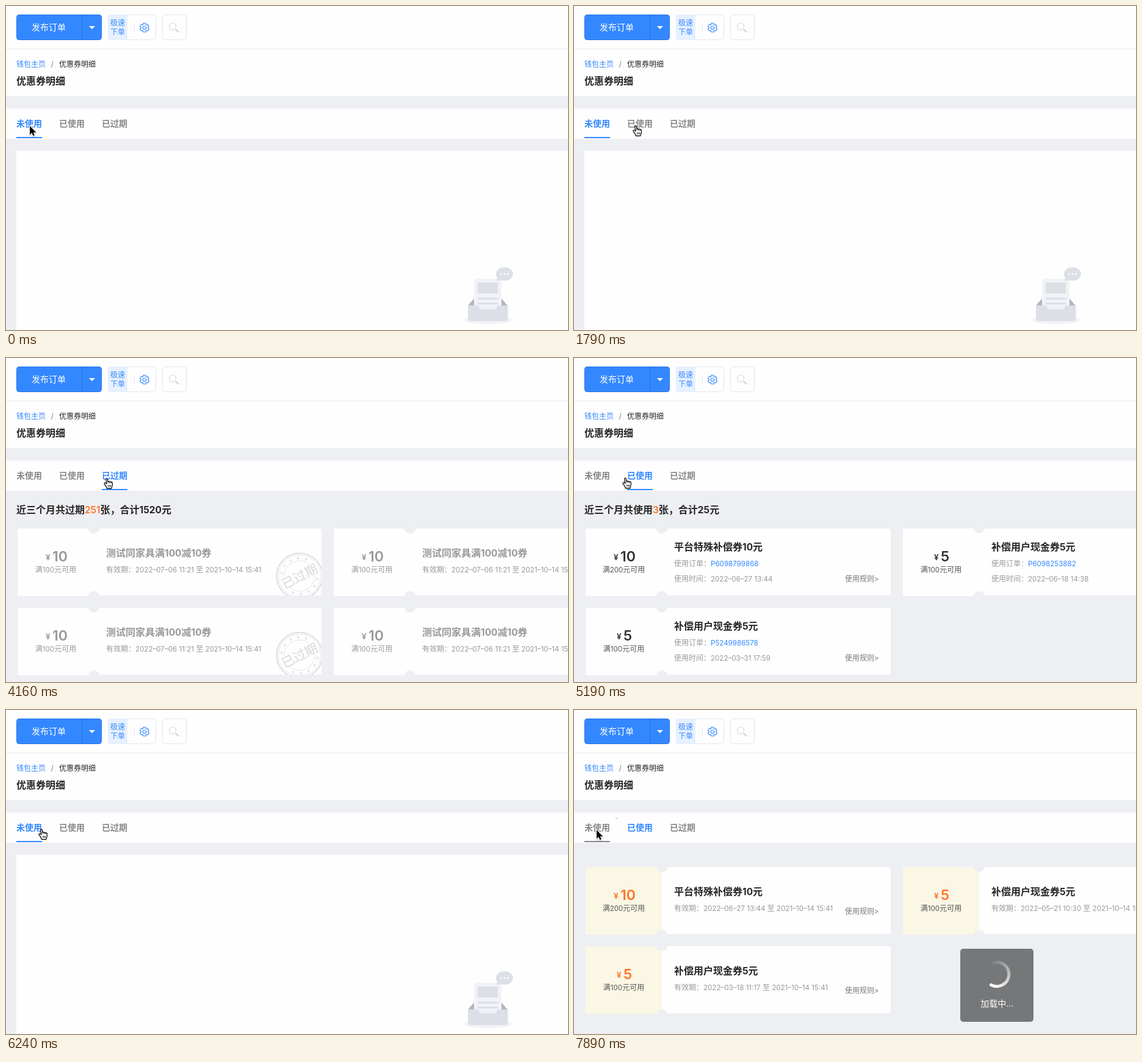
These frames come from a looping animation (921x532 px, 8000 ms). An HTML page with a canvas:

```html
<!DOCTYPE html>
<html lang="zh-CN">
<head>
<meta charset="utf-8">
<title>优惠券明细</title>
<style>
html, body { margin: 0; width: 100%; height: 100%; overflow: hidden; background: #fefefe; }
canvas { display: block; }
</style>
</head>
<body>
<canvas id="stage" width="921" height="532"></canvas>
<script>
const ctx = document.getElementById('stage').getContext('2d');
const W = 921, H = 532, LOOP = 8000, TICK = 148.7;
const BLUE = '#3388ff', GRAY = '#888888', ORANGE = '#ff7426', INK = '#262626';
const PAGE = '#eeeff3', PAPER = '#fefefe', PALE = '#dcdfe6';

const couponsUsed = [
  { price: 10, min: 200, title: '平台特殊补偿券10元', id: 'P6098799868', at: '2022–06–27 13:44', from: '2022–06–27 13:44' },
  { price: 5, min: 100, title: '补偿用户现金券5元', id: 'P6098253882', at: '2022–06–18 14:38', from: '2022–05–21 10:30' },
  { price: 5, min: 100, title: '补偿用户现金券5元', id: 'P5249986578', at: '2022–03–31 17:59', from: '2022–03–18 11:17' }
];
const expired = { price: 10, min: 100, title: '测试同家具满100减10券', id: '', at: '', from: '2022–07–06 11:21' };
const lists = {
  none: { items: [] },
  used: { items: couponsUsed, count: 3, sum: 25, pitch: 520 },
  old: { items: Array(4).fill(expired), count: 251, sum: 1520, pitch: 518 }
};

// Each scene holds until the next; prev and mix describe the tab colour change.
const scenes = [
  { at: 0, tab: 0, list: 'none' },
  { at: 14, tab: 1, list: 'none', busy: true, prev: 0, mix: 0 },
  { at: 16, tab: 1, list: 'used' },
  { at: 26, tab: 2, list: 'used', busy: true, prev: 1, mix: 0 },
  { at: 27, tab: 2, list: 'old' },
  { at: 33, tab: 1, list: 'old', busy: true, prev: 2, mix: 0 },
  { at: 34, tab: 1, list: 'used' },
  { at: 39, tab: 0, list: 'used', busy: true, prev: 1, mix: 0, badge: 0.2 },
  { at: 40, tab: 0, list: 'used', busy: true, badge: 1 },
  { at: 41, tab: 0, list: 'none' },
  { at: 47, tab: 1, list: 'none', busy: true, prev: 0, mix: 0.4 },
  { at: 48, tab: 1, list: 'none', busy: true },
  { at: 49, tab: 1, list: 'used' },
  { at: 53, tab: 0, list: 'used', busy: true, prev: 1, mix: 0, badge: 0.2 }
];

// Pointer moves: start tick, end tick, x, y.
const moves = [
  [2, 4, 77, 197], [5, 7, 41, 197], [8, 13, 108, 197], [20, 24, 165, 198],
  [29, 31, 97, 198], [34, 37, 47, 196], [41, 45, 117, 197], [48, 51, 37, 197]
];
const arrowSpans = [[0, 3], [14, 18], [26, 28], [33, 34], [39, 42], [47, 49], [53, 60]];

const isLatin = s => /[\x20-\x7e¥–]/.test(s);

function setFont(latin, size, weight) {
  ctx.font = latin
    ? `${weight} ${size * 0.965}px Inter, "Noto Sans CJK SC", sans-serif`
    : `${weight} ${size}px "Noto Sans CJK SC", "Noto Sans CJK", sans-serif`;
}

// Draws mixed text from x, centred on y; returns the end x.
function text(str, x, y, size, color, weight = 400, align = 0) {
  const runs = str.match(/[\x20-\x7e¥–]+|[^\x20-\x7e¥–]+/g) || [];
  const widths = runs.map(r => {
    setFont(isLatin(r), size, weight);
    return ctx.measureText(r).width;
  });
  x -= align * widths.reduce((a, b) => a + b, 0);
  ctx.fillStyle = color;
  runs.forEach((r, i) => {
    setFont(isLatin(r), size, weight);
    ctx.fillText(r, x, y + Math.round(size * 0.37));
    x += widths[i];
  });
  return x;
}

function rect(x, y, w, h, color) {
  ctx.fillStyle = color;
  ctx.fillRect(x, y, w, h);
}

function box(x, y, w, h, r, fill, stroke) {
  ctx.beginPath();
  ctx.roundRect(x, y, w, h, r);
  if (fill) { ctx.fillStyle = fill; ctx.fill(); }
  if (stroke) { ctx.strokeStyle = stroke; ctx.lineWidth = 1; ctx.stroke(); }
}

function oval(x, y, rx, ry, color) {
  ctx.beginPath();
  ctx.ellipse(x, y, rx, ry, 0, 0, Math.PI * 2);
  ctx.fillStyle = color;
  ctx.fill();
}

function ring(x, y, r, color, width) {
  ctx.beginPath();
  ctx.arc(x, y, r, 0, Math.PI * 2);
  ctx.strokeStyle = color;
  ctx.lineWidth = width;
  ctx.stroke();
}

function poly(points, color) {
  ctx.beginPath();
  points.forEach(p => ctx.lineTo(p[0], p[1]));
  ctx.closePath();
  if (color) { ctx.fillStyle = color; ctx.fill(); }
}

function blend(a, b, k) {
  const part = (c, i) => parseInt(c.substr(1 + i * 2, 2), 16);
  return `rgb(${[0, 1, 2].map(i => Math.round(part(a, i) + (part(b, i) - part(a, i)) * k))})`;
}

function gear(x, y) {
  const pts = [];
  for (let i = 0; i < 6; i++) {
    const a = i * Math.PI / 3 + Math.PI / 6;
    [[-0.4, 5.8], [-0.27, 7.6], [0.27, 7.6], [0.4, 5.8]].forEach(([d, r]) =>
      pts.push([x + Math.cos(a + d) * r, y + Math.sin(a + d) * r]));
  }
  poly(pts);
  ctx.strokeStyle = BLUE;
  ctx.lineWidth = 1.1;
  ctx.lineJoin = 'round';
  ctx.stroke();
  ring(x, y, 2.8, BLUE, 1.1);
}

function header() {
  rect(0, 0, W, H, PAPER);
  rect(0, 70, W, 1, '#ebecf0');
  box(17.5, 14.5, 139, 41, 4, BLUE, '#2b74dc');
  rect(124, 15, 1, 40, '#2b74dc');
  text('发布订单', 42, 35, 14, '#fff', 500);
  poly([[136, 33], [146, 33], [141, 38]], '#fff');

  box(167.5, 14.5, 78, 41, 4, PAPER, '#e1e4eb');
  box(167, 14, 32, 42, [4, 0, 0, 4], '#e6f0fe');
  text('极速', 171, 28, 12, BLUE);
  text('下单', 171, 43, 12, BLUE);
  rect(210, 30, 1, 11, '#e4e6ea');
  gear(227, 35.5);

  box(256.5, 14.5, 39, 41, 4, PAPER, '#e1e4eb');
  ring(273, 33.5, 5.5, '#d2d2d2', 1);
  ctx.beginPath();
  ctx.moveTo(277.5, 38);
  ctx.lineTo(283, 43);
  ctx.strokeStyle = '#bbb';
  ctx.lineWidth = 1.4;
  ctx.stroke();

  text('钱包主页', 17, 96, 12, BLUE);
  text('/', 73.5, 96, 12, '#777');
  text('优惠券明细', 87, 96, 12, INK);
  text('优惠券明细', 17, 123, 16, INK, 700);
  rect(0, 148, W, 20, PAGE);
  rect(0, 218, W, H - 218, PAGE);
}

function tabs({ tab, prev = -1, mix = 1, badge }) {
  ['未使用', '已使用', '已过期'].forEach((name, i) => {
    const k = i === tab ? mix : i === prev ? 1 - mix : 0;
    const color = blend(GRAY, BLUE, k);
    text(name, 17 + i * 70, 193, 14, color, 700);
    if (i === tab) rect(17 + i * 70, 215, 42, 2, color);
  });
  if (badge) {
    ctx.globalAlpha = badge;
    oval(70, 178, 10 * badge, 10 * badge, '#ff4d5f');
    if (badge === 1) text('3', 70, 178, 12, '#fff', 400, 0.5);
    ctx.globalAlpha = 1;
  }
}

function emptyView() {
  rect(17, 238, W, H, PAPER);
  oval(790, 516, 41, 6.5, '#f3f4f7');
  poly([[757, 492], [769, 478], [810, 478], [822, 492]], '#aeb5c1');
  box(767, 448, 45, 54, 1, '#f1f2f6');
  rect(773, 454, 33, 18, PALE);
  rect(773, 479, 33, 3, PALE);
  rect(773, 487, 33, 3, PALE);
  box(757, 491.5, 65.5, 26, [0, 0, 4, 4], PALE);
  poly([[773, 491], [806, 491], [803.5, 496], [801, 498], [778, 498], [775.5, 496]], '#f1f2f6');
  rect(773, 487, 33, 3, PALE);
  oval(817, 440, 14, 11, PALE);
  poly([[805, 443], [804.5, 451.5], [814, 449]], PALE);
  [811, 816.5, 822].forEach(x => oval(x, 440, 1.5, 1.5, '#fff'));
}

function stamp(x, y) {
  const color = '#dedede';
  ring(x, y, 37.5, color, 2);
  ring(x, y, 34.5, color, 0.8);
  ring(x, y, 25, color, 0.8);
  for (let i = 0; i < 14; i++) {
    const a = -0.3 + i * Math.PI * 2 / 14;
    if (Math.abs(Math.sin(a + 0.47)) < 0.35) continue;
    const cx = x + Math.cos(a) * 29.5, cy = y + Math.sin(a) * 29.5;
    const pts = [];
    for (let j = 0; j < 10; j++) {
      const b = j * Math.PI / 5 - Math.PI / 2, r = j % 2 ? 1.2 : 2.8;
      pts.push([cx + Math.cos(b) * r, cy + Math.sin(b) * r]);
    }
    poly(pts, color);
  }
  ctx.save();
  ctx.translate(x, y);
  ctx.rotate(-0.47);
  rect(-32, -10.5, 64, 21, PAPER);
  text('已过期', 0, 0, 21, '#d8d8d8', 400, 0.5);
  ctx.restore();
}

function card(c, x, y, w, tab) {
  const fresh = tab === 0, dead = tab === 2;
  const mute = '#999';
  box(x + 120, y, w - 120, 110, [0, 4, 4, 0], PAPER);
  box(x, y, 125, 111, [2, 0, 0, 2], fresh ? '#fbf7e5' : PAPER);
  ctx.save();
  ctx.beginPath();
  ctx.rect(x, y, w, 110);
  ctx.clip();
  if (dead) stamp(x + 462, y + 78);
  ctx.restore();
  oval(x + 125, y - 1.5, 9.7, 9.7, PAGE);
  oval(x + 125, y + 112.5, 9.7, 9.7, PAGE);

  const tone = fresh ? ORANGE : dead ? mute : '#333';
  const left = x + (c.price > 9 ? 46 : 51);
  text('¥', left, y + 47, 14, tone, 600);
  text(String(c.price), left + 11, y + 45, 24, tone, 600);
  text(`满${c.min}元可用`, x + 62.5, y + 68, 12, dead ? mute : '#555', 400, 0.5);

  const tx = x + 145;
  text(c.title, tx, y + (tab === 1 ? 30 : 40), 16, dead ? mute : INK, 700);
  if (tab === 1) {
    text(c.id, text('使用订单：', tx, y + 58, 12, mute), y + 58, 12, BLUE);
    text('使用时间：' + c.at, tx, y + 83, 12, mute);
  } else {
    text(`有效期：${c.from} 至 2021–10–14 15:41`, tx, y + 68, 12, mute);
  }
  if (!dead) text('使用规则>', x + 425, y + (fresh ? 73 : 83), 12, '#777');
}

function listView({ tab, list }) {
  const { items, count, sum, pitch } = lists[list];
  if (!items.length) return emptyView();
  const top = tab ? 280 : 258;
  if (tab) {
    let x = text(tab === 1 ? '近三个月共使用' : '近三个月共过期', 17, 249, 16, INK, 700);
    x = text(String(count), x, 249, 16, ORANGE, 600);
    text(`张，合计${sum}元`, x, 249, 16, INK, 700);
  }
  items.forEach((c, i) =>
    card(c, 19 + (i % 2) * pitch, top + Math.floor(i / 2) * 130, pitch - 20, tab));
}

function loader() {
  box(633, 392, 120, 120, 5, 'rgba(0,0,0,0.5)');
  const start = -Math.PI * 0.68, end = Math.PI * 0.66;
  const g = ctx.createConicGradient(start, 693, 434);
  g.addColorStop(0, 'rgba(255,255,255,0)');
  g.addColorStop(0.62, '#fff');
  g.addColorStop(0.8, '#fff');
  g.addColorStop(0.81, 'rgba(255,255,255,0)');
  ctx.beginPath();
  ctx.arc(693, 434, 19.8, start, end);
  ctx.strokeStyle = g;
  ctx.lineWidth = 5;
  ctx.lineCap = 'round';
  ctx.stroke();
  ctx.lineCap = 'butt';
  text('加载中...', 693, 482, 14, '#fff', 400, 0.5);
}

const arrow = new Path2D('M0 0V14.4L3.3 11.3 5.5 16.3 7.9 15.3 5.8 10.5H10.4Z');
const hand = new Path2D('M4.9 9.6 3.3 8.2C1.9 7.2 0.4 8.5 1.2 9.8L4.2 13.8 5.4 17.2H12.9L13.3 15C14.6 12.6 14.7 10.4 14.3 7.7 14 6.2 12.3 6.3 12 7.2 11.6 5.5 9.8 5.5 9.4 6.5 9 5 7.3 5 6.9 6L6.3 1.9C6 0.2 3.6 0.4 3.8 2.2Z');
const creases = new Path2D('M6.9 6 7.2 8.4M9.4 6.5 9.7 8.6M12 7.2 12.1 8.9M7.6 11.5V14.6M9.6 11.5V14.6M11.5 11.5V14.6');

function pointer(tick) {
  let x = 39, y = 197;
  for (const [a, b, nx, ny] of moves) {
    const k = Math.min(1, Math.max(0, (tick - a) / (b - a)));
    const e = k * k * (3 - 2 * k);
    x += (nx - x) * e;
    y += (ny - y) * e;
  }
  const isArrow = arrowSpans.some(([a, b]) => tick >= a && tick < b);
  ctx.save();
  ctx.lineJoin = 'round';
  ctx.shadowColor = 'rgba(0,0,0,0.3)';
  ctx.shadowBlur = 2;
  ctx.shadowOffsetY = 1;
  if (isArrow) {
    ctx.translate(x, y);
    ctx.strokeStyle = '#fff';
    ctx.lineWidth = 2;
    ctx.stroke(arrow);
    ctx.shadowColor = 'transparent';
    ctx.fillStyle = '#000';
    ctx.fill(arrow);
  } else {
    ctx.translate(x - 5, y - 1);
    ctx.fillStyle = '#fff';
    ctx.fill(hand);
    ctx.shadowColor = 'transparent';
    ctx.strokeStyle = '#000';
    ctx.lineWidth = 1.2;
    ctx.stroke(hand);
    ctx.lineWidth = 0.9;
    ctx.stroke(creases);
  }
  ctx.restore();
}

function draw(now) {
  const tick = Math.floor((now % LOOP + 16) / TICK);
  const scene = scenes.filter(s => s.at <= tick).pop();
  header();
  tabs(scene);
  listView(scene);
  if (scene.busy) loader();
  pointer(tick);
  requestAnimationFrame(draw);
}
requestAnimationFrame(draw);
</script>
</body>
</html>
```
